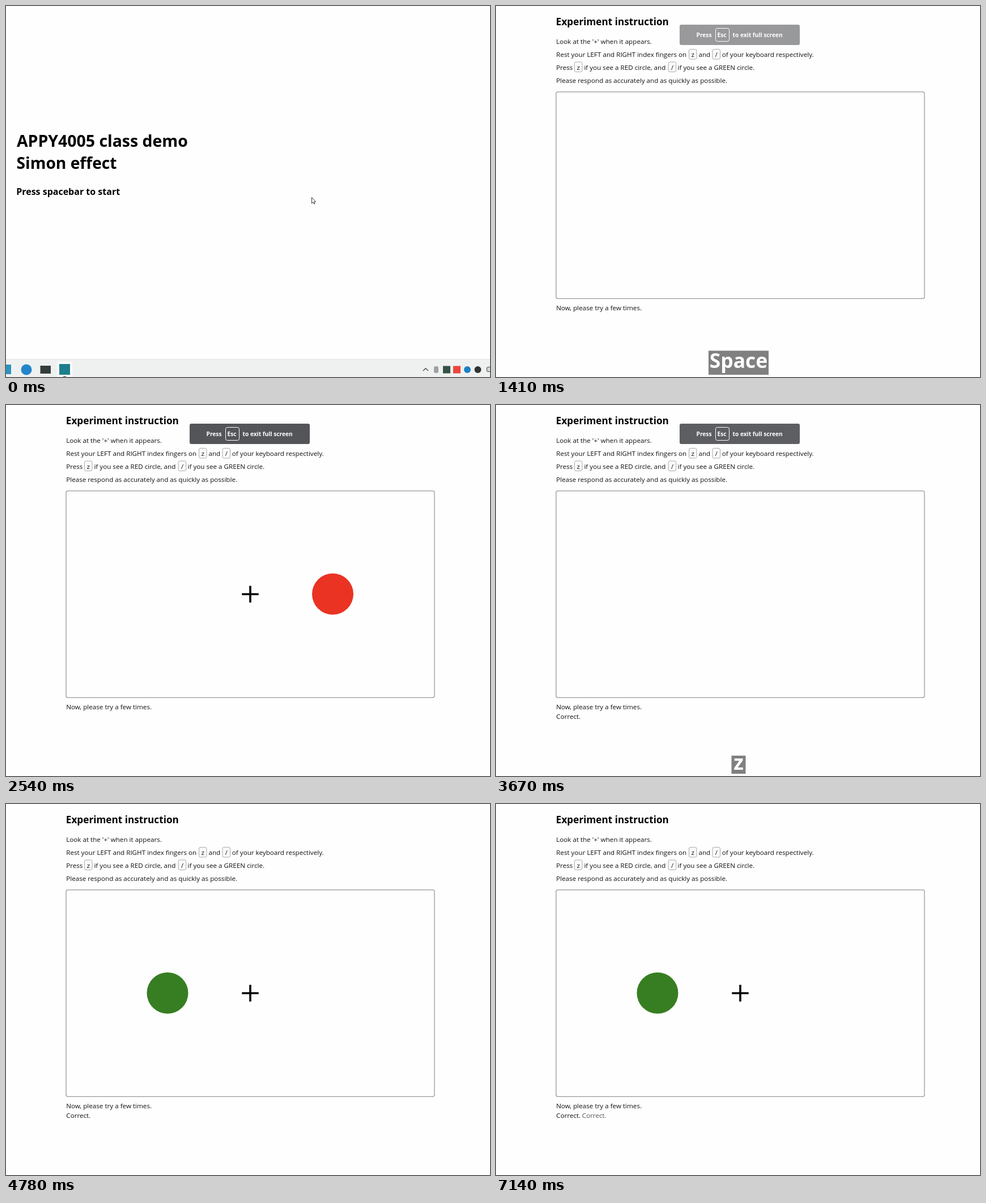
An HTML page that plays this animation: 854 px wide and 656 px high, repeating every 8 s.

```html
<!DOCTYPE html>
<html lang="en">
<head>
<meta charset="utf-8">
<title>Class demo</title>
<style>
html, body { margin: 0; width: 100%; height: 100%; overflow: hidden; background: #fefefe; }
svg { display: block; }
text { font-family: "Open Sans", "Noto Sans", sans-serif; white-space: pre; }
.bold { font-weight: 700; }
.body { font-size: 11.65px; fill: #111; }
.toast { font-size: 10.2px; font-weight: 700; fill: #fff; }
.press { font-size: 35.4px; font-weight: 700; fill: #fff; text-anchor: middle; }
.cap rect { fill: #fafafa; stroke: #aaa; }
.cap text { font: 11px "Noto Sans Mono", "DejaVu Sans Mono", monospace; fill: #222; text-anchor: middle; }
</style>
</head>
<body>
<svg width="854" height="656" viewBox="0 0 854 656">
  <g data-show="0-1270">
    <g class="bold">
      <text x="19" y="249" font-size="28.45">APPY4005 class demo</text>
      <text x="18.6" y="288" font-size="28.2">Simon effect</text>
      <text x="18.2" y="333.5" font-size="16">Press spacebar to start</text>
    </g>
    <path d="M539.5 338.5v10.5l2.4-2.2 1.7 3.4 1.5-.7-1.6-3.3h3z" fill="#fff" stroke="#222" stroke-width=".9"/>
  </g>

  <g data-show="0-70">
    <rect y="624" width="854" height="32" fill="#eff1f1"/>
    <path d="M0 624.5H854" stroke="#e4e6e6"/>
    <rect x="90" y="629" width="27" height="27" rx="3" fill="#fafbfb"/>
    <rect x="-9" y="634" width="18" height="17" fill="#2b93bd"/>
    <circle cx="36" cy="643" r="9.5" fill="#2386ca"/>
    <rect x="60.5" y="636" width="18.5" height="14" fill="#343c3c"/>
    <rect x="94" y="633" width="19" height="19" fill="#1d7f8d"/>
    <path d="M101 655.5h5" stroke="#555" stroke-width="1.5"/>
    <path d="M736 645l4.5-4.5 4.5 4.5" fill="none" stroke="#333" stroke-width="1.2"/>
    <rect x="755" y="637" width="8" height="12" rx="3" fill="#a0a2a2"/>
    <rect x="771" y="636.5" width="13" height="13" fill="#365244"/>
    <rect x="789" y="636.5" width="13" height="13" fill="#ef443b"/>
    <circle cx="814" cy="643" r="6" fill="#1c80c5"/>
    <circle cx="832.5" cy="643" r="6" fill="#303432"/>
    <rect x="848.5" y="638.5" width="12" height="8" rx="1" fill="none" stroke="#333"/>
    <path d="M850 641h4M850 644h4" stroke="#444" stroke-dasharray="1 1"/>
  </g>

  <g data-show="1270-8000">
    <text class="bold" x="105.8" y="34" font-size="17.2">Experiment instruction</text>
    <g class="body">
      <text x="106.2" y="67">Look at the '+' when it appears.</text>
      <text x="106.2" y="90">Rest your LEFT and RIGHT index fingers on</text>
      <text x="357.5" y="90">and</text>
      <text x="398.8" y="90">of your keyboard respectively.</text>
      <text x="106.2" y="112.5">Press</text>
      <text x="155.4" y="112.5">if you see a RED circle, and</text>
      <text x="320.5" y="112.5">if you see a GREEN circle.</text>
      <text x="106.2" y="135.5">Please respond as accurately and as quickly as possible.</text>
      <text x="106.2" y="538">Now, please try a few times.</text>
    </g>
    <g id="caps" class="cap"></g>
    <rect x="106" y="151.8" width="650" height="365.5" rx="3" fill="none" stroke="#999" stroke-width="1.3"/>
  </g>

  <text class="body" data-show="3670-8000" x="106.3" y="554.5">Correct.</text>
  <text class="body" data-show="6150-8000" x="151.8" y="554.5" style="fill:#555">Correct.</text>

  <path data-show="2140-3670 4150-6150 6610-8000" d="M416.3 334.5H445.7M431 319.8V349.2" stroke="#000" stroke-width="3.6"/>
  <circle data-show="2540-3670" cx="576.5" cy="334.3" r="36.5" fill="#ea3323"/>
  <circle data-show="4780-6150 7140-8000" cx="285" cy="334.3" r="36.5" fill="#377e22"/>

  <g id="toast">
    <rect x="324" y="33" width="212" height="36" rx="3" fill="#545559"/>
    <rect x="387.5" y="39.5" width="24" height="23" rx="3" fill="none" stroke="#fff"/>
    <g class="toast">
      <text x="353.5" y="54.5">Press</text>
      <text x="390.5" y="54.5">Esc</text>
      <text x="417.5" y="54.5">to exit full screen</text>
    </g>
  </g>

  <g data-show="1200-2080">
    <rect x="375" y="609.5" width="106" height="42.5" fill="#808080"/>
    <text class="press" x="428" y="640">Space</text>
  </g>
  <g data-show="3670-4560">
    <rect x="415.5" y="620" width="25" height="32" fill="#808080"/>
    <text class="press" x="428" y="645" style="font-size:36px">z</text>
  </g>
  <g data-show="6150-7020">
    <rect x="416" y="612" width="24" height="40" fill="#808080"/>
    <text class="press" x="428" y="647" style="font-size:42px">/</text>
  </g>
</svg>
<script>
const LOOP = 8000, STEP = 67;
const toast = document.getElementById("toast");

// Small keyboard caps inside the instruction lines: label, left edge, top edge
document.getElementById("caps").innerHTML =
  [["z", 340.5, 76.5], ["/", 382, 76.5], ["z", 138.5, 99], ["/", 304.2, 99]].map(([label, x, y]) =>
    `<rect x="${x}" y="${y}" width="13.5" height="17.5" rx="2.5"/>
     <text x="${x + 6.8}" y="${y + 13.5}">${label}</text>`).join("");

const parts = [...document.querySelectorAll("[data-show]")].map(el => ({
  el, spans: el.dataset.show.split(" ").map(span => span.split("-").map(Number))
}));

function toastOpacity(t) {
  const steps = start => Math.floor((t - start) / STEP);
  if (t < 1270 || t >= 4150) return 0;
  if (t < 3670) return Math.min(1, steps(1200) * 0.197);
  return 0.94 - 0.15 * Math.min(5, steps(3670));
}

function draw(t) {
  for (const { el, spans } of parts)
    el.style.display = spans.some(([from, to]) => t >= from && t < to) ? "" : "none";
  toast.style.opacity = toastOpacity(t);
}

const start = performance.now();
function tick() {
  draw((performance.now() - start) % LOOP);
  requestAnimationFrame(tick);
}
tick();
</script>
</body>
</html>
```
